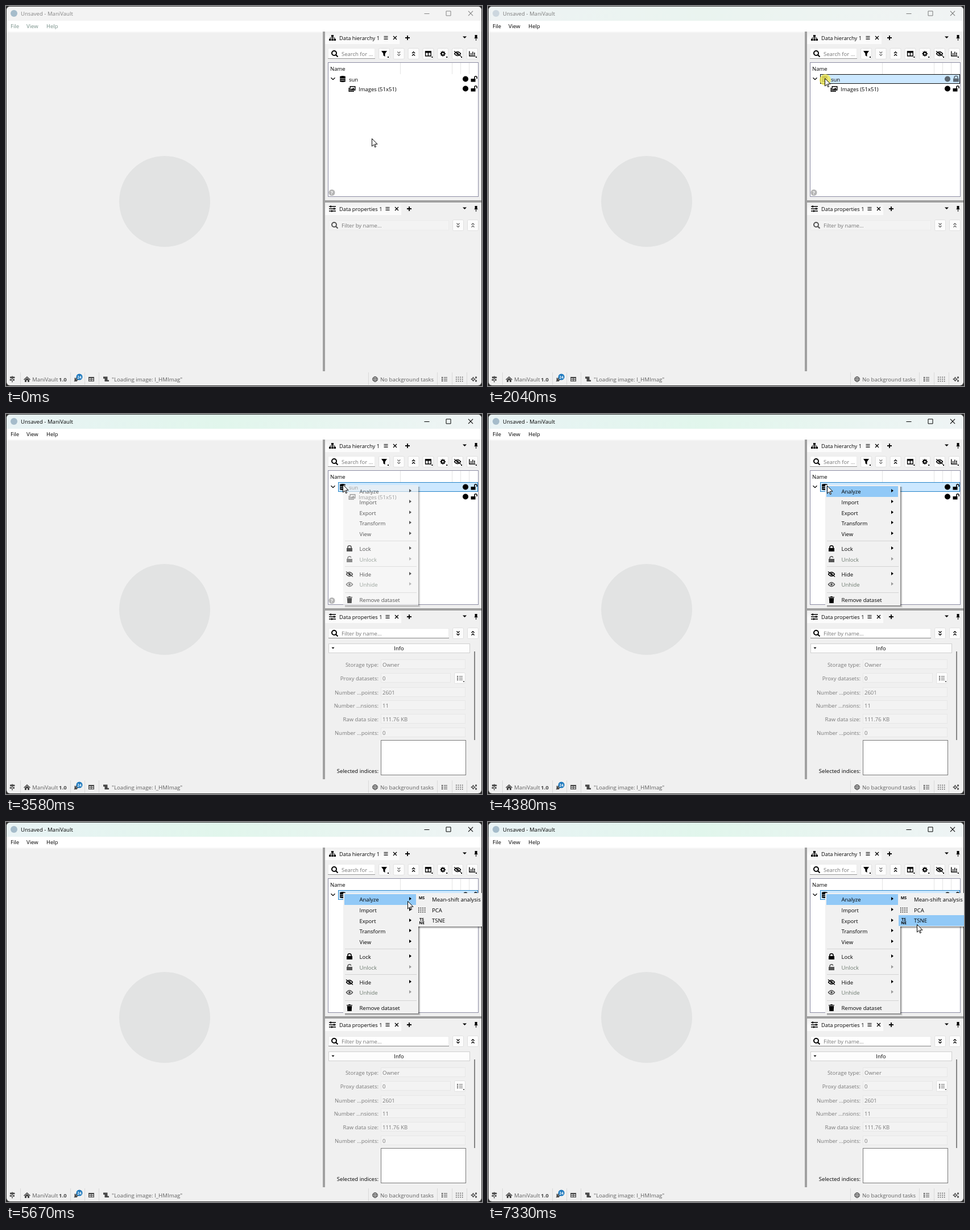
An HTML page with a canvas that plays this animation: 837x669 px, repeating every 7400 ms.

```html
<!DOCTYPE html>
<html lang="en">
<head>
<meta charset="utf-8">
<title>Data hierarchy</title>
<style>
html, body { margin: 0; width: 100%; height: 100%; overflow: hidden; background: #303030; }
canvas { display: block; }
</style>
</head>
<body>
<canvas id="stage" width="837" height="669"></canvas>
<script>
const ctx = document.getElementById('stage').getContext('2d');
const LOOP = 7400;

// name: [filled path, stroked path, line width], all centred on 0,0
const ICONS = {
  search: ['', 'M2 2L5.5 5.5M3-1A4 4 0 1 1-5-1A4 4 0 1 1 3-1', 2],
  tree: ['M-2-5h4v3.5h-4zM-6 2h3.5v3h-3.5zM-1.7 2h3.5v3h-3.5zM2.5 2h3.5v3h-3.5z', 'M0-2V2M-4.2 2V.2H4.2V2', 1],
  sliders: ['M-4-5.5h2v3h-2zM2-1.5h2v3h-2zM-2 2.5h2v3h-2z', 'M-6-4H6M-6 0H6M-6 4H6', 1.5],
  bars: ['', 'M-3.5-2.5h7M-3.5 0h7M-3.5 2.5h7', 1],
  close: ['', 'M-3-3L3 3M3-3L-3 3', 1.3],
  plus: ['', 'M-4 0h8M0-4v8', 1.8],
  drop: ['M-3.5-1.5h7L0 2z', '', 0],
  arrow: ['M-2-3L2 0L-2 3z', '', 0],
  pin: ['M-2-5h4v5h1v1h-2.5v4h-1v-4h-2.5v-1h1z', '', 0],
  funnel: ['M-5-5h10L1.5 0v5L-1.5 3V0z', '', 0],
  downs: ['', 'M-2.5-3.5L0-1L2.5-3.5M-2.5 .7L0 3.2L2.5 .7', 1.4],
  ups: ['', 'M-2.5-.7L0-3.2L2.5-.7M-2.5 3.5L0 1L2.5 3.5', 1.4],
  chevron: ['', 'M-3.5-1.7L0 1.7L3.5-1.7', 1.3],
  smallChevron: ['M-2.5-1.2h5L0 1.5z', '', 0],
  columns: ['M-5.5-4.5h11v3h-11z', 'M-4.8-4h9.6v8h-9.6zM0-4v8', 1.4],
  gear: ['', 'M2.5 0A2.5 2.5 0 1 1-2.5 0A2.5 2.5 0 1 1 2.5 0M0-4.7v2M0 2.7v2M-4.7 0h2M2.7 0h2M-3.3-3.3l1.3 1.3M2 2l1.3 1.3M-3.3 3.3l1.3-1.3M2-2l1.3-1.3', 1.8],
  gears: ['', 'M.5 0A2 2 0 1 1-3.5 0A2 2 0 1 1 .5 0M4.5-3A1 1 0 1 1 2.5-3A1 1 0 1 1 4.5-3M4.5 3A1 1 0 1 1 2.5 3A1 1 0 1 1 4.5 3M-1.5-4v2M-1.5 2v2M-5.5 0h2M.5 0h2', 1.3],
  eye: ['M2 0A2 2 0 1 1-2 0A2 2 0 1 1 2 0', 'M-5.5 0Q0-7 5.5 0Q0 7-5.5 0z', 1.5],
  hidden: ['M2 0A2 2 0 1 1-2 0A2 2 0 1 1 2 0', 'M-5.5 0Q0-7 5.5 0Q0 7-5.5 0zM-6-4.5L6 4.5', 1.3],
  chart: ['', 'M-5-4.5V4H5.5M-2 2.5V-1M1 2.5V-3.5M4 2.5V-2', 1.4],
  db: ['M-5-3.6Q-5-5.5 0-5.5T5-3.6V-2.6Q5-1 0-1T-5-2.6zM-5-1Q0 1 5-1V.8Q5 2 0 2T-5 .8zM-5 2Q0 4 5 2V3.8Q5 5.5 0 5.5T-5 3.8z', '', 0],
  images: ['M-2.5 1.5L-.5-1L.5 0L2.5-2.5L4.5 1.5z', 'M-3.3-4.3h8.6v6.4h-8.6zM-5.3-2v6.2H3.5', 1.4],
  locked: ['M-5-1h10v6h-10z', 'M-3-1V-2.5A3 2.8 0 0 1 3-2.5V-1', 1.6],
  unlocked: ['M-5.5-.5h8v5.5h-8z', 'M.8-.5V-2.5A2.1 2.2 0 0 1 5-2.5V-.5', 1.5],
  open: ['M-5-1h10v6h-10z', 'M-3-1V-2.5A3 2.8 0 0 1 2.8-3.3', 1.6],
  trash: ['M-4.2-3h8.4L3.7 6h-7.4zM-5-5h3l.7-1h2.6l.7 1h3v1.2h-10z', '', 0],
  list: ['M-5-4h2v2h-2zM-5-1h2v2h-2zM-5 2h2v2h-2z', 'M-1.5-3H5M-1.5 0H5M-1.5 3H5', 1.2],
  sign: ['M-4-4.5H3.5L5-3L3.5-1.5H-4zM4 0H-3.5L-5 1.3L-3.5 2.6H4zM-.7-5.5H.7V5.5H-.7z', '', 0],
  home: ['M0-5L6 .5L5 1.5L0-3L-5 1.5L-6 .5zM-4 1.2L0-2.3L4 1.2V5H1V2H-1V5H-4z', '', 0],
  plug: ['M-4.5-2L1 3.5L-1 5H-3L-4.5 3.5zM1-3L4 0L1 3L-3-1z', 'M-5 5L-3 3', 1.3],
  table: ['M-5-4h10v2.5h-10z', 'M-4.4-3.5h8.8v7h-8.8zM0-3V3.5M-4.4 .8h8.8', 1.2],
  scroll: ['M-5-4.5H2.5V1.5H5V4H-2.5V-1H-5z', '', 0],
  globe: ['', 'M4.4 0A4.4 4.4 0 1 1-4.4 0A4.4 4.4 0 1 1 4.4 0M1.9 0A1.9 4.4 0 1 1-1.9 0A1.9 4.4 0 1 1 1.9 0M-4.4-1.4H4.4M-4.4 1.4H4.4', 1],
  dots: ['', 'M-6-3.5H6.5M-6 0H6.5M-6 3.5H6.5', 1.6],
  minus: ['', 'M-4.5 .5h9', 1],
  square: ['', 'M-3.5-3.5h8v8h-8z', 1],
  cursor: ['M.5 .5V14L3.6 11L5.7 15.6L7.6 14.8L5.5 10.2H10z', '', 0]
};
for (const def of Object.values(ICONS)) {
  def[0] = new Path2D(def[0]);
  def[1] = new Path2D(def[1]);
}

// [start, end, steps, x, y]: stepped pointer moves
const MOVES = [
  [130, 820, 11, 617, 149], [890, 960, 2, 613, 137], [1030, 1170, 3, 605, 129],
  [1640, 1710, 2, 592, 127], [2700, 2700, 1, 592, 126], [2980, 3050, 2, 592, 124],
  [4380, 4600, 4, 607, 130], [5400, 5670, 5, 706, 139], [5735, 6140, 7, 754, 163],
  [6210, 6270, 2, 754, 172], [7330, 7330, 1, 754, 180]
];
// [start, end, x, y]
const CLICKS = [[2040, 2160, 593, 130], [3380, 3510, 592, 124], [4670, 4990, 607, 130]];

const clamp = v => Math.max(0, Math.min(1, v));

function pointer(t) {
  let x = 643, y = 233;
  for (const [start, end, steps, tx, ty] of MOVES) {
    if (t < start) break;
    const step = (end - start) / (steps - 1) || 1;
    const p = Math.min(1, (Math.floor((t - start) / step + .01) + 1) / steps);
    x += (tx - x) * p;
    y += (ty - y) * p;
  }
  return [Math.round(x), Math.round(y)];
}

function rect(x, y, w, h, fill, border) {
  ctx.fillStyle = fill;
  ctx.fillRect(x, y, w, h);
  if (border) {
    ctx.strokeStyle = border;
    ctx.lineWidth = 1;
    ctx.strokeRect(x + .5, y + .5, w - 1, h - 1);
  }
}

function disc(x, y, r, color) {
  ctx.fillStyle = color;
  ctx.beginPath();
  ctx.arc(x, y, r, 0, 7);
  ctx.fill();
}

function text(s, x, y, color = '#000', size = 9.5, align = 'left', weight = '') {
  ctx.font = `${weight} ${size}px "Open Sans", "Noto Sans", sans-serif`;
  ctx.textAlign = align;
  ctx.fillStyle = color;
  ctx.fillText(s, x, y + 3.5);
}

function icon(name, x, y, color = '#000') {
  const [fill, stroke, width] = ICONS[name];
  ctx.save();
  ctx.translate(x, y);
  ctx.fillStyle = ctx.strokeStyle = color;
  ctx.fill(fill);
  if (width) {
    ctx.lineWidth = width;
    ctx.stroke(stroke);
  }
  ctx.restore();
}

function button(name, x, y, color, more) {
  ctx.fillStyle = '#fcfcfc';
  ctx.strokeStyle = '#e0e0e0';
  ctx.lineWidth = 1;
  ctx.beginPath();
  ctx.roundRect(x - 9.5, y - 9.5, 19, 19, 2);
  ctx.fill();
  ctx.stroke();
  icon(name, x, y, color);
  if (more) rect(x + 6, y + 5, 2, 2, color);
}

function titleBar(active) {
  const ink = active ? '#000' : '#858585';
  let fill = '#f3f3f3';
  if (active) {
    fill = ctx.createLinearGradient(0, 0, 837, 0);
    fill.addColorStop(0, '#e9f3f5');
    fill.addColorStop(.45, '#e1f6ec');
    fill.addColorStop(1, '#eff4f5');
  }
  rect(1, 1, 835, 25, fill);
  rect(1, 26, 835, 19, '#fff');
  disc(14, 13, 6, '#a5bccb');
  text('Unsaved - ManiVault', 26, 13, ink, 9.6);
  icon('minus', 740, 13, ink);
  icon('square', 777.5, 12.5, ink);
  ctx.save();
  ctx.translate(817, 13);
  ctx.scale(1.35, 1.35);
  ctx.strokeStyle = ink;
  ctx.lineWidth = .8;
  ctx.stroke(ICONS.close[1]);
  ctx.restore();
  const menuInk = active ? '#000' : '#789089';
  text('File', 8, 35, menuInk);
  text('View', 36, 35, menuInk);
  text('Help', 71, 35, menuInk);
}

function dockTab(name, title, y, end) {
  const shade = ctx.createLinearGradient(0, y - 10, 0, y + 2);
  shade.addColorStop(0, '#f0f0f0');
  shade.addColorStop(1, '#fbfbfb');
  rect(561, y - 10, end + 8 - 561, 21, shade);
  icon(name, 574, y);
  text(title, 586, y, '#000', 9.3);
  icon('bars', end - 16, y);
  icon('close', end, y);
  icon('plus', end + 22, y);
  icon('drop', 806.5, y - 1);
  icon('pin', 826.5, y);
}

function hierarchy(t, x, y) {
  dockTab('tree', 'Data hierarchy 1', 56, 684);
  rect(566, 74, 83, 19, '#fff', '#ececec');
  rect(566, 92, 83, 1, '#999');
  icon('search', 578, 84);
  text('Search for ...', 590, 84, '#777', 9.5);
  ['funnel', 'downs', 'ups', 'columns', 'gear', 'hidden', 'chart'].forEach((name, i) =>
    button(name, 665 + i * 25.8, 84, i === 1 ? '#777' : '#000', i !== 1 && i !== 2));

  rect(566, 99, 265, 237, '#fff', '#8c8ca3');
  text('Name', 570, 110, '#000', 9.5);
  for (const sx of [693, 784, 799, 814]) rect(sx, 100, 1, 20, '#e5e5e5');

  const selected = t >= 2040, busy = selected && t < 2230;
  if (selected) rect(584, 120, 246, 17, '#cce8ff', t < 2100 ? '#111' : '#2684c8');
  else if (y < 137) rect(584, 120, 246, 17, '#e5f3fb');
  else if (y < 154) rect(601, 138, 229, 16, '#e5f3fb');

  const ink = busy ? '#5b6670' : '#000';
  icon('chevron', 575, 128);
  icon('db', 592, 128.5, ink);
  text('sun', 603, 129);
  disc(808, 128.5, 5, ink);
  icon(busy ? 'locked' : 'unlocked', 823, 128.5, ink);
  icon('images', 608.5, 146);
  text('Images (51x51)', 620, 146);
  disc(808, 145.5, 5, '#000');
  icon('unlocked', 823, 145.5);
  if (t < 3850) {
    disc(573, 328.5, 5.5, '#b5b5b5');
    text('?', 573, 328.5, '#fff', 9, 'center', 'bold');
  }
}

function properties(loaded) {
  dockTab('sliders', 'Data properties 1', 357, 687);
  const ink = loaded ? '#000' : '#666';
  rect(567, 377, 212, 18, loaded ? '#fff' : '#f3f3f3', '#ebebeb');
  if (loaded) rect(567, 394, 212, 1, '#868686');
  icon('search', 578, 386, loaded ? '#000' : '#555');
  text('Filter by name...', 590, 386, '#777');
  button('downs', 795, 386, ink);
  button('ups', 821, 386, ink);
  if (!loaded) return;

  rect(567, 404, 249, 17, '#fdfdfd', '#d0d0d0');
  icon('smallChevron', 575, 412);
  text('Info', 691, 412.5, '#000', 9.5, 'center');
  rect(823, 418, 2, 156, '#858585');
  const rows = [
    ['Storage type:', 'Owner', 441], ['Proxy datasets:', '0', 465],
    ['Number ...points:', '2601', 490], ['Number ...nsions:', '11', 513],
    ['Raw data size:', '111.76 KB', 537], ['Number ...points:', '0', 561]
  ];
  rows.forEach(([label, value, y], i) => {
    text(label, 655, y, '#7a7a7a', 9.5, 'right');
    rect(659, y - 9, i === 1 ? 123 : 149, 17, '#f3f3f3', '#e7e7e7');
    text(value, 662, y, '#777');
  });
  button('list', 798, 465, '#666', true);
  text('Selected indices:', 655, 628, '#000', 9.5, 'right');
  rect(659, 574, 150, 62, '#fff', '#7a7a7a');
}

function statusBar() {
  const ink = '#484848', soft = '#606060';
  for (const x of [25, 113, 138, 163, 637, 758, 784, 810]) rect(x, 645, 1, 22, '#dadada');
  icon('sign', 11, 657, ink);
  icon('home', 37, 657, ink);
  text('ManiVault', 46, 657, soft, 9.7);
  text('1.0', 93, 657, ink, 9.5, 'left', 'bold');
  icon('plug', 125, 656, ink);
  disc(129, 653, 5.5, '#1c78bd');
  text('24', 129, 652.3, '#fff', 6.5, 'center', 'bold');
  icon('table', 150, 657, ink);
  icon('scroll', 176, 657, ink);
  text('"Loading image: I_HMImag"', 186, 657, soft, 9.7);
  icon('globe', 649, 657, ink);
  text('No background tasks', 658, 657, soft, 9.6);
  icon('list', 771, 657, ink);
  dotGrid(797, 657, ink);
  icon('gears', 823, 657, ink);
}

function dotGrid(x, y, color) {
  ctx.save();
  ctx.setLineDash([1.6, 2]);
  icon('dots', x, y, color);
  ctx.restore();
}

// The shadow stays outside the panel, so it does not show through while fading in.
function panel(x, y, w, h) {
  rect(x, y, w, h, '#f1f1f1');
  for (let i = 0; i < 4; i++) {
    const shade = `rgba(0,0,0,${.45 * (1 - i / 4) ** 1.5})`;
    rect(x + w + i, y + 3, 1, h - 3 + i, shade);
    rect(x + 3, y + h + i, w - 3 + i + 1, 1, shade);
  }
}

function contextMenu(t) {
  const alpha = clamp((t - 3450) / 200);
  if (!alpha) return;
  ctx.globalAlpha = alpha;
  panel(593, 125, 132, 212);
  if (t >= 4380) rect(595, 127, 126, 19, '#91c9f7');
  for (const y of [223, 268, 314]) rect(596, y, 126, 1, '#d3d3d3');
  const items = [
    ['Analyze', 136], ['Import', 155], ['Export', 174], ['Transform', 192], ['View', 211],
    ['Lock', 237, 'locked'], ['Unlock', 256, 'open', true],
    ['Hide', 282, 'hidden'], ['Unhide', 300, 'eye', true], ['Remove dataset', 327, 'trash']
  ];
  for (const [label, y, name, off] of items) {
    text(label, 621.5, y, off ? '#6d7a6f' : '#000');
    if (name) icon(name, 604, y, off ? '#555' : '#000');
    if (name !== 'trash') icon('arrow', 711, y - 1, off ? '#999' : '#000');
  }
  ctx.globalAlpha = 1;
}

function subMenu(t, x, y) {
  const alpha = clamp((t - 4760) / 230);
  if (!alpha) return;
  ctx.globalAlpha = alpha;
  panel(722, 125, 120, 59);
  if (x > 722) rect(722, 127 + 18.5 * Math.min(2, Math.floor((y - 127) / 18.5)), 115, 19, '#91c9f7');
  text('MS', 731, 132.5, '#000', 7, 'center', 'bold');
  dotGrid(731, 155, '#000');
  text('TS', 731, 170, '#000', 7, 'center', 'bold');
  text('NE', 731, 176.5, '#000', 7, 'center', 'bold');
  ['Mean-shift analysis', 'PCA', 'TSNE'].forEach((label, i) =>
    text(label, 749, 136.5 + i * 18.5, '#000', 9.6));
  ctx.globalAlpha = 1;
}

function draw(now) {
  const t = now % LOOP;
  const [x, y] = pointer(t);
  rect(0, 0, 837, 669, '#303030');
  ctx.save();
  ctx.beginPath();
  ctx.roundRect(1, 1, 835, 667, 6);
  ctx.clip();
  rect(1, 1, 835, 667, '#f0f0f0');
  titleBar(t >= 2040);
  if (t >= 2040 && t < 2100) rect(1, 1, 835, 25, 'rgba(243,243,243,.5)');
  rect(1, 45, 556, 2, '#f7f7f7');
  disc(279, 344, 80, '#e2e3e3');
  rect(557, 45, 4, 598, '#a0a0a0');
  rect(561, 342, 276, 4, '#a0a0a0');
  hierarchy(t, x, y);
  properties(t >= 2230);
  statusBar();
  ctx.restore();

  contextMenu(t);
  subMenu(t, x, y);
  for (const [start, end, cx, cy] of CLICKS)
    if (t >= start && t < end) disc(cx, cy, 10, 'rgba(244,232,70,.75)');
  icon('cursor', x, y, '#fff');
  ctx.save();
  ctx.translate(x, y);
  ctx.strokeStyle = '#000';
  ctx.lineWidth = 1;
  ctx.stroke(ICONS.cursor[0]);
  ctx.restore();
}

function frame() {
  draw(performance.now());
  requestAnimationFrame(frame);
}
frame();
</script>
</body>
</html>
```
